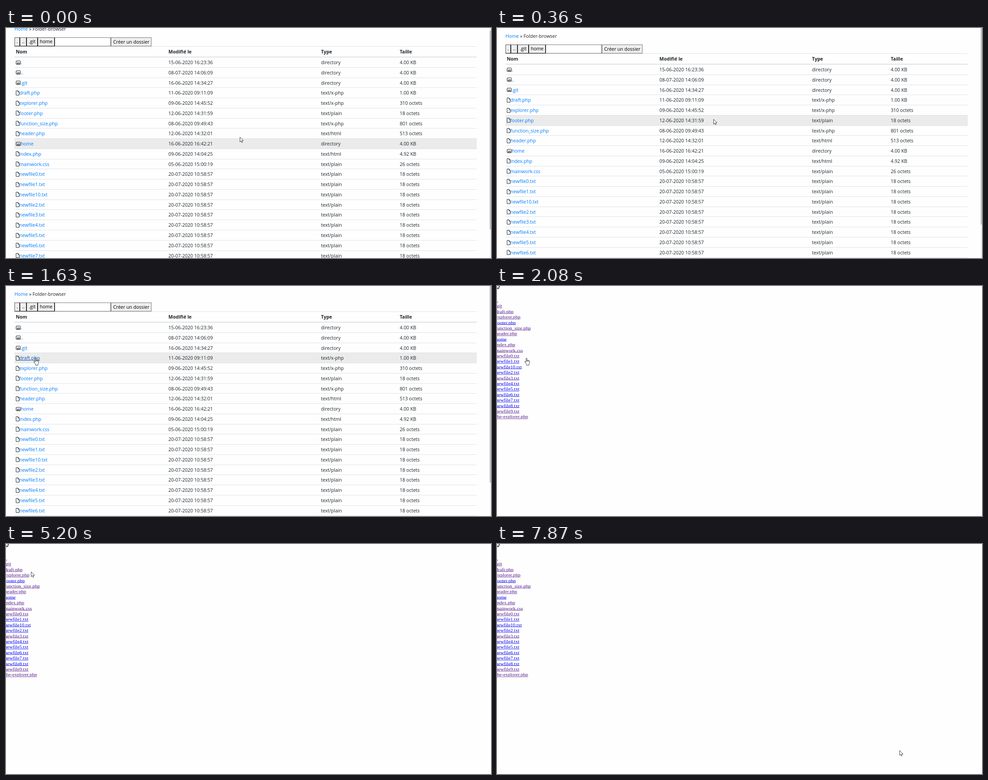
Animation, 1087 px wide and 515 px high, one loop 8000 ms. Source, as an HTML page:

```html
<!DOCTYPE html>
<html lang="fr">
<head>
<meta charset="utf-8">
<title>Explorateur</title>
<style>
html, body { margin: 0; width: 100%; height: 100%; overflow: hidden; background: #fefefe; }
#stage { position: relative; width: 1087px; height: 515px; overflow: hidden; }
#stage [hidden] { display: none; }
.scene { position: absolute; inset: 0; overflow: hidden; }

#table { font: 10.55px/22px "Open Sans", "Noto Sans", sans-serif; color: #212529; white-space: nowrap; }
#table a { color: #007bff; text-decoration: none; }
#table a.on { color: #0056b3; text-decoration: underline; }
#page { position: absolute; left: 19px; top: 6.5px; width: 1036px; }
#tools { display: flex; margin-top: 8.5px; }
#tools span { box-sizing: border-box; height: 20px; padding: 0 4.2px; line-height: 18px; background: #efefef; color: #000; border: 1px solid #767676; }
#tools .dir { padding: 0 3.75px; line-height: 17px; border: 1.5px outset #000; }
#tools .field { width: 126px; background: #fff; }
.row { display: grid; grid-template-columns: 342px 342px 176.5px auto; padding-left: 3px; height: 22.77px; box-sizing: border-box; border-top: 1px solid #dee2e6; }
.row.on { background: #ebebeb; }
.head { height: 24px; font-weight: 700; border-bottom: 1px solid #dee2e6; }
.row svg { height: 11px; vertical-align: -1.5px; fill: none; stroke: #212529; }
#bar { position: absolute; right: 0; top: 0; width: 3px; height: 100%; background: #f1f1f1; }
#thumb { width: 3px; height: 445px; background: #c1c1c1; }

#list div { position: absolute; left: -3.4px; top: -13.1px; transform: scale(.689); transform-origin: 0 0; font: 16px/18px "Liberation Serif", serif; white-space: nowrap; }
#list h1 { margin: 0 0 .67em; font-size: 32px; line-height: 36px; color: #000; }
#list a { color: #00e; text-decoration: underline; }
#list a.seen { color: #551a8b; }

#cursor { position: absolute; left: 0; top: 0; width: 20px; height: 24px; overflow: visible; pointer-events: none; fill: #fff; stroke: #111; stroke-width: 1.15; stroke-linejoin: round; }
</style>
</head>
<body>
<div id="stage">
  <div id="table" class="scene">
    <div id="page">
      <div><a>Home</a> » Folder-browser</div>
      <div id="tools">
        <span class="dir">.</span><span class="dir">..</span><span class="dir">.git</span><span class="dir">home</span>
        <span class="field"></span><span>Créer un dossier</span>
      </div>
      <div class="row head"><span>Nom</span><span>Modifié le</span><span>Type</span><span>Taille</span></div>
    </div>
    <div id="bar"><div id="thumb"></div></div>
  </div>
  <div id="list" class="scene" hidden><div><h1>./</h1></div></div>
  <svg id="cursor">
    <path id="arrow" transform="scale(.68)" d="M.6 .6V16.5L4.2 13L6.6 18.6L9.2 17.5L7 12H11.8Z"/>
    <path id="hand" transform="translate(-4.3) scale(.68)" d="M5 14V2a1.5 1.5 0 0 1 3 0V8Q16 7.5 16.4 11V16L14.6 20V24H6.5V21L1 13Q0 10 5 13M8 8V12M11 8V12M14 9V12"/>
  </svg>
</div>
<script>
const LOOP = 8000, SCROLL_AT = 120, SWITCH_AT = 2080, TICK = 140;
const ROW_TOP = 81, ROW = 22.77, HOME_ROW = 8;
const $ = id => document.getElementById(id);

function add(parent, html) {
  parent.insertAdjacentHTML('beforeend', html);
  return parent.lastElementChild;
}

// Table page
const fileIcon = '<svg width="8" viewBox="0 0 8 11"><path d="M.6 .6H5L7.4 3V10.4H.6ZM4.8 .6V3.2H7.4"/></svg>';
const dirIcon = '<svg width="11" viewBox="0 0 11 11"><rect x=".6" y="1.6" width="9.8" height="7.8" rx=".8"/><path d="M2 4H3.5M2 8L4 6L5 7L7 4.5L9 8Z"/></svg>';
const entries = `.|15-06-2020 16:23:36|directory|4.00 KB
..|08-07-2020 14:06:09|directory|4.00 KB
.git|16-06-2020 14:34:27|directory|4.00 KB
draft.php|11-06-2020 09:11:09|text/x-php|1.00 KB
explorer.php|09-06-2020 14:45:52|text/x-php|310 octets
footer.php|12-06-2020 14:31:59|text/plain|18 octets
function_size.php|08-06-2020 09:49:43|text/x-php|801 octets
header.php|12-06-2020 14:32:01|text/html|513 octets
home|16-06-2020 16:42:21|directory|4.00 KB
index.php|09-06-2020 14:04:25|text/html|4.92 KB
mainwork.css|05-06-2020 15:00:19|text/plain|26 octets`.split('\n').map(line => line.split('|'));
const newFiles = [...Array(11).keys()].map(n => `newfile${n}.txt`).sort();
for (const name of newFiles) entries.push([name, '20-07-2020 10:58:57', 'text/plain', '18 octets']);

const rows = entries.map(([name, ...info]) => {
  const icon = info[1] === 'directory' ? dirIcon : fileIcon;
  const cells = info.map(text => `<span>${text}</span>`).join('');
  return add($('page'), `<div class="row"><span>${icon}<a>${name}</a></span>${cells}</div>`);
});
// sort() puts newfile10 before newfile1's dot only by code order, so names stay as listed

// Plain list page
const unseen = /^(home|footer|newfile([124-8]|10)\.)/;
for (const name of [...entries.slice(1).map(e => e[0]), 'the-explorer.php']) {
  add($('list').firstElementChild, `<a class="${unseen.test(name) ? '' : 'seen'}">${name}</a><br>`);
}

// Pointer moves: each bends from the previous end through a control point
const origin = [524, 244];
const moves = [
  { from: 120, to: 360, via: [520, 230], end: [485, 204] },
  { from: 500, to: 1100, via: [240, 125], end: [84, 159] },
  { from: 1250, to: 1630, via: [74, 160], end: [66, 161] },
  { from: 3170, to: 4080, via: [322, 75], end: [129, 62] },
  { from: 4230, to: 5200, via: [95, 52], end: [56, 62] },
  { from: 5350, to: 6280, via: [155, 160], end: [36, 86] },
  { from: 6400, to: 7300, via: [29, 240], end: [99, 317] },
  { from: 7450, to: 7870, via: [700, 455], end: [902, 462] }
];

// The screen is refreshed in even steps during a move
function progress({ from, to }, t) {
  const steps = Math.round((to - from) / TICK);
  const step = Math.floor((t - from) / (to - from) * steps + 1e-6);
  return Math.min(1, (step + 1) / (steps + 1));
}

function pointerAt(t) {
  const i = moves.findLastIndex(m => m.from <= t);
  if (i < 0) return origin;
  const start = i ? moves[i - 1].end : origin;
  const { via, end } = moves[i];
  const p = progress(moves[i], t), q = 1 - p;
  return start.map((s, k) => Math.round(q * q * s + 2 * p * q * via[k] + p * p * end[k]));
}

function draw(t) {
  const [x, y] = pointerAt(t);
  const onTable = t < SWITCH_AT, atStart = t < SCROLL_AT;

  $('table').hidden = !onTable;
  $('list').hidden = onTable;
  $('page').style.transform = atStart ? 'translateY(-16px)' : 'none';
  $('thumb').style.transform = `translateY(${atStart ? 6 : -5}px)`;

  const hot = atStart ? HOME_ROW : Math.floor((y - ROW_TOP) / ROW);
  const link = document.elementFromPoint(x, y)?.closest('a');
  rows.forEach((row, i) => {
    const a = row.querySelector('a');
    row.classList.toggle('on', i === hot);
    a.classList.toggle('on', a === link);
  });

  // The hand stays until the pointer moves on the new page
  const waiting = !onTable && t < moves[3].from;
  const hand = !!link || waiting;
  $('hand').style.display = hand ? '' : 'none';
  $('arrow').style.display = hand ? 'none' : '';
  $('cursor').style.transform = `translate(${x}px, ${y}px)`;
}

const start = performance.now();
function tick() {
  draw((performance.now() - start) % LOOP);
  requestAnimationFrame(tick);
}
tick();
</script>
</body>
</html>
```
